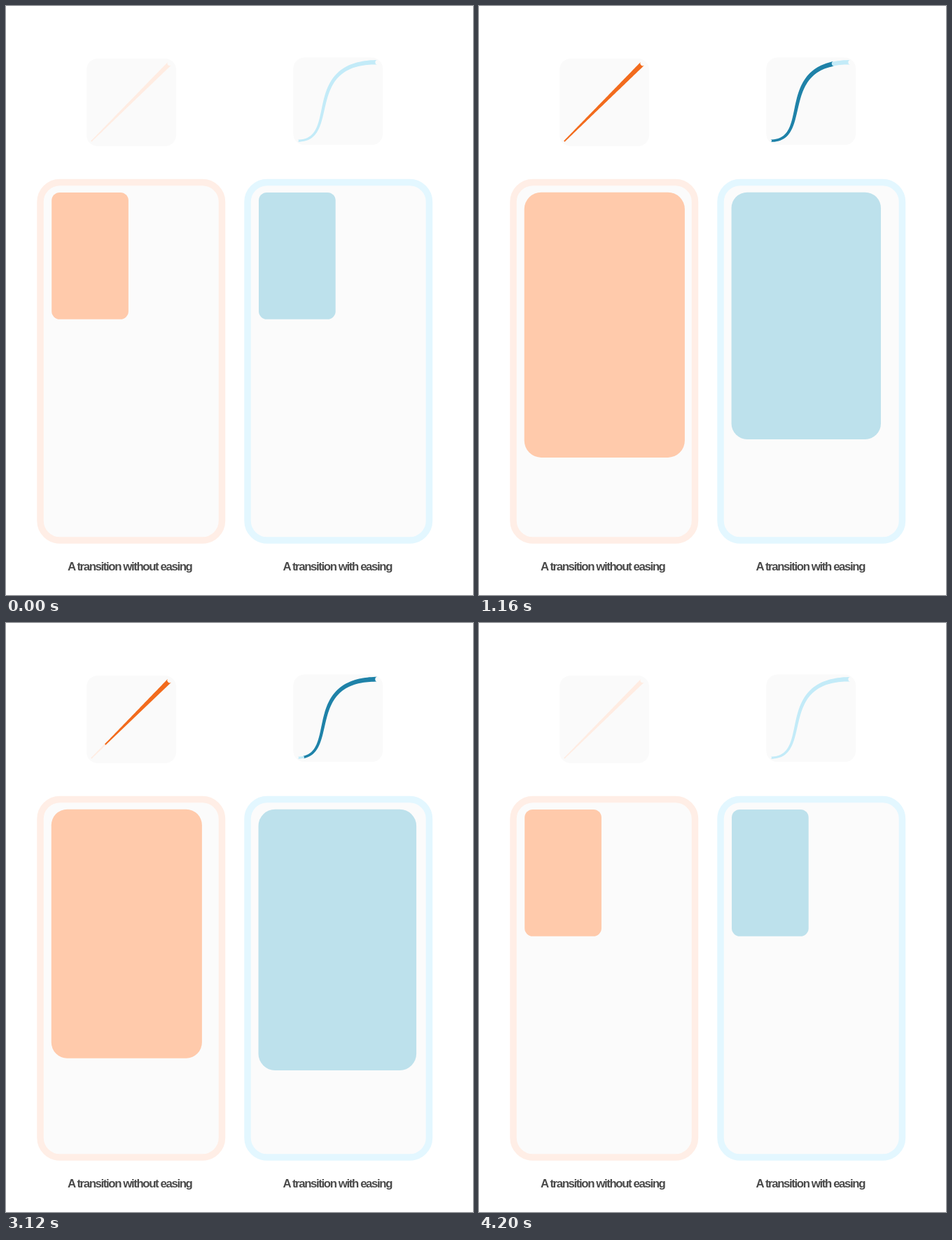
Write an HTML page that moves like this. It is 667 by 840 pixels and loops after 4320 ms.

```html
<!DOCTYPE html>
<html lang="en">
<head>
<meta charset="utf-8">
<title>Easing comparison</title>
<style>
  html, body { margin: 0; width: 100%; height: 100%; overflow: hidden; background: #fff; }
  svg { display: block; width: 667px; height: 840px; }
  text {
    font: bold 16.8px "Liberation Sans", Arial, sans-serif;
    letter-spacing: -1.38px;
    fill: #4a4a4a;
  }
  .chart { fill: #fafafa; }
  .phone { fill: #fbfbfb; stroke-width: 9.5; }
  .guide { fill: none; }
  .linear { --frame: #ffeee6; --card: #ffcaab; --pale: #ffece2; --dark: #f26b1d; }
  .eased { --frame: #e3f7ff; --card: #bde1ec; --pale: #c3ebf8; --dark: #1f82a8; }
  .phone { stroke: var(--frame); }
  .card { fill: var(--card); }
  .track { fill: var(--pale); }
  .trace { fill: var(--dark); }
</style>
</head>
<body>
<svg viewBox="0 0 667 840">
  <g class="linear">
    <rect class="chart" x="115" y="75" width="128" height="125" rx="16"/>
    <path class="guide" d="M121.3 193.5L233.7 82"/>
    <path class="track"/>
    <path class="trace"/>
    <rect class="phone" x="49" y="251.5" width="259.5" height="510.5" rx="28"/>
    <rect class="card"/>
    <text x="88" y="805.3">A transition without easing</text>
  </g>
  <g class="eased">
    <rect class="chart" x="410.3" y="73.5" width="128" height="124.7" rx="16"/>
    <path class="guide" d="M416.5 192.2C478.5 192.2 420 80.2 530.6 80.2"/>
    <path class="track"/>
    <path class="trace"/>
    <rect class="phone" x="345" y="251.5" width="259.5" height="510.5" rx="28"/>
    <rect class="card"/>
    <text x="395.5" y="805.3">A transition with easing</text>
  </g>
</svg>
<script>
const LOOP = 4320, STEP = 40;
const LEAD = 40; // the traces retract slightly ahead of the cards

const clamp = v => Math.min(1, Math.max(0, v));
const mix = (a, b, p) => a + (b - a) * p;
const linear = x => x;

// cubic-bezier(x1, 0, 0, 1)
const ease = x1 => x => {
  if (x <= 0 || x >= 1) return x;
  let lo = 0, hi = 1;
  for (let i = 0; i < 30; i++) {
    const t = (lo + hi) / 2;
    if (3 * x1 * t * (1 - t) ** 2 + t ** 3 < x) lo = t; else hi = t;
  }
  return lo * lo * (3 - 2 * lo);
};

const phase = (start, length, curve) => time => curve(clamp((time - start) / length));

// Outline of the guide between two fractions, tapering from w0 to w1
function taper(guide, from, to, w0, w1) {
  const total = guide.getTotalLength();
  const count = 60, left = [], right = [];
  for (let i = 0; i <= count; i++) {
    const u = i / count, at = mix(from, to, u) * total;
    const p = guide.getPointAtLength(at);
    const a = guide.getPointAtLength(Math.max(0, at - 0.5));
    const b = guide.getPointAtLength(Math.min(total, at + 0.5));
    const len = Math.hypot(b.x - a.x, b.y - a.y) || 1;
    const r = mix(w0, w1, u) / 2;
    const nx = (b.y - a.y) / len * r, ny = (a.x - b.x) / len * r;
    left.push(`${(p.x + nx).toFixed(2)} ${(p.y + ny).toFixed(2)}`);
    right.unshift(`${(p.x - nx).toFixed(2)} ${(p.y - ny).toFixed(2)}`);
  }
  const cap = (w, point) => `A${w / 2} ${w / 2} 0 0 0 ${point}`;
  return `M${left.join("L")}${cap(w1, right[0])}L${right.join("L")}${cap(w0, left[0])}Z`;
}

function makePanel(name, { x, widths, grow, shrink }) {
  const find = part => document.querySelector(`.${name} .${part}`);
  const guide = find("guide"), trace = find("trace"), card = find("card");
  const [w0, w1] = widths;
  find("track").setAttribute("d", taper(guide, 0, 1, w0 - 0.4, w1 - 0.4));

  return time => {
    const p = grow(time) - shrink(time);
    const width = mix(109.7, 229.2, p);
    const box = {
      x: mix(x, x - 0.5, p), y: mix(266, 265.7, p),
      width, height: mix(180.8, 378.2, p), rx: width * 0.105
    };
    for (const key in box) card.setAttribute(key, box[key]);

    const from = shrink(time + LEAD), to = grow(time);
    const shown = to - from > 0.0005;
    trace.setAttribute("d", shown ? taper(guide, from, to, w0, w1) : "");
  };
}

const panels = [
  makePanel("linear", {
    x: 65.2, widths: [1.8, 7],
    grow: phase(407, 750, linear),
    shrink: phase(3040, 680, linear)
  }),
  makePanel("eased", {
    x: 361, widths: [3.4, 6.8],
    grow: phase(407, 1430, ease(0.55)),
    shrink: phase(2870, 1350, ease(0.735))
  })
];

const begin = performance.now();
function draw(now) {
  const time = Math.max(0, now - begin) % LOOP;
  const tick = Math.floor(time / STEP) * STEP;
  panels.forEach(paint => paint(tick));
  requestAnimationFrame(draw);
}
draw(begin);
</script>
</body>
</html>
```
